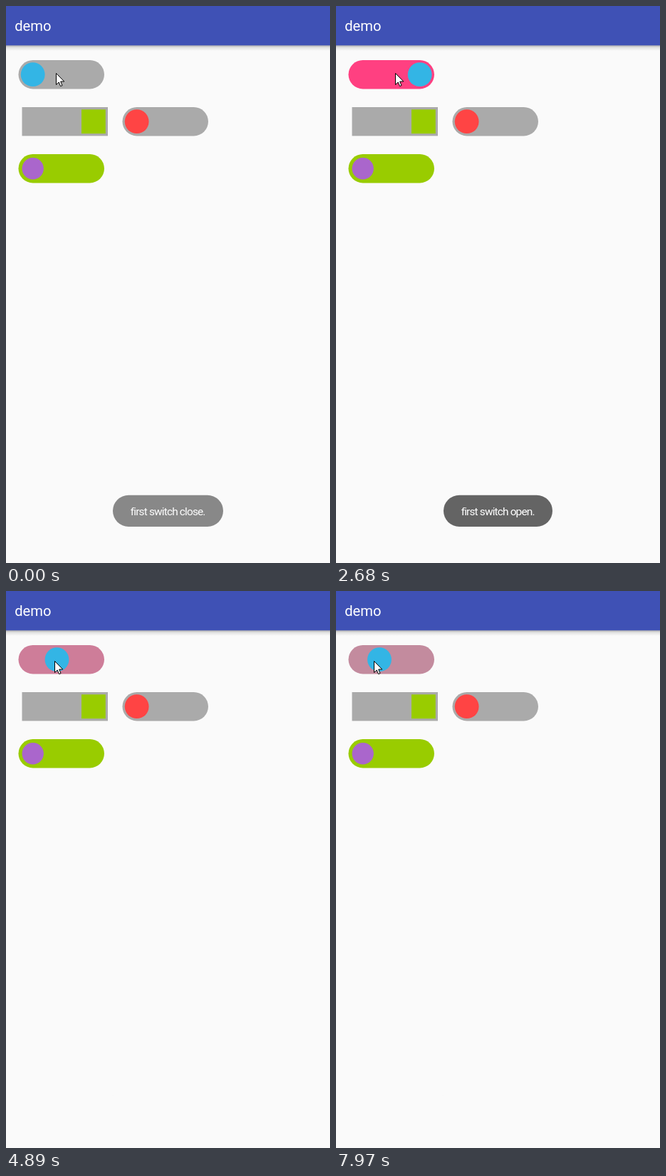
Recreate the animation shown at these times as an HTML page. Size 455 by 782 pixels, loop 8000 ms.

```html
<!DOCTYPE html>
<html lang="en">
<head>
<meta charset="utf-8">
<title>Switch demo</title>
<style>
html, body { margin: 0; width: 100%; height: 100%; overflow: hidden; background: #fafafa; }
svg { display: block; width: 100%; height: 100%; }
text { font-family: Roboto, sans-serif; fill: #fff; }
</style>
</head>
<body>
<svg viewBox="0 0 455 782">
  <defs>
    <linearGradient id="shade" x2="0" y2="1">
      <stop offset="0" stop-opacity=".32"/>
      <stop offset=".4" stop-opacity=".1"/>
      <stop offset="1" stop-opacity="0"/>
    </linearGradient>
    <rect id="bar" width="120.5" height="40.4"/>
    <rect id="slot" width="120.5" height="40.4" rx="20.2"/>
  </defs>
  <rect width="455" height="782" fill="#fafafa"/>
  <rect y="55" width="455" height="8" fill="url(#shade)"/>
  <rect width="455" height="55.3" fill="#3f51b5"/>
  <text x="12.2" y="35" font-size="20.2">demo</text>

  <use id="track" href="#slot" x="17.5" y="76"/>
  <circle id="knob" cy="96.2" r="16.9" fill="#33b5e5"/>

  <use href="#bar" x="22.5" y="142" fill="#aaa"/>
  <rect x="106" y="145.3" width="33.8" height="33.8" fill="#9c0"/>

  <use href="#slot" x="163.5" y="142" fill="#aaa"/>
  <circle cx="183.7" cy="162.2" r="16.9" fill="#f44"/>

  <use href="#slot" x="17.5" y="208" fill="#9c0"/>
  <circle cx="37.7" cy="228.2" r="15.2" fill="#a6c"/>

  <g id="toast">
    <rect id="pill" y="686.7" height="44.2" rx="22.1" fill="#646464"/>
    <text id="label" x="227.2" y="715.2" font-size="15.5" letter-spacing="-.87" text-anchor="middle"></text>
  </g>

  <path id="cursor" d="M.5 .5V16.5L4.2 13L6.6 18.6L9 17.6L6.7 12H11.8Z" fill="#fff" stroke="#000"/>
</svg>
<script>
const LOOP = 8000, REFRESH = 139, LEAD = 115;
const OFF = 37.7, ON = 117.7;
const FADE = 310, TOAST_LIFE = 2055;
const $ = id => document.getElementById(id);

const clamp = (v, lo, hi) => Math.min(hi, Math.max(lo, v));
const ramp = (t, from, to) => clamp((t - from) / (to - from), 0, 1);
const glide = (t, from, to) => (1 - Math.cos(Math.PI * ramp(t, from, to))) / 2;

function cursorAt(t) {
  const hover = 13 * glide(t, 600, 1050);
  const wander = 45 * glide(t, 3000, 3630) - 13 * glide(t, 2810, 3000);
  const firstDrag = 59 * glide(t, 4734, 5300) - 57 * glide(t, 3860, 4734);
  const secondDrag = 23 * glide(t, 7700, 7940) - 87 * glide(t, 6500, 7440);
  const arc = ramp(t, 2810, 3630);
  return {
    x: Math.round(70 + hover + wander + firstDrag + secondDrag),
    y: Math.round(94 + 4 * arc + 10 * Math.sin(Math.PI * arc))
  };
}

// A tap flips the switch; later the knob follows the cursor, which slips along it at each end.
function knobAt(t, cursorX) {
  if (t < 3800) return OFF + (ON - OFF) * glide(t, 1850, 2220);
  const grip = t < 6000 ? 3.5 : t < 7600 ? 1.4 : 8;
  return clamp(cursorX + grip, OFF, ON);
}

const toastAlpha = (t, start) =>
  ramp(t, start, start + FADE) - ramp(t, start + TOAST_LIFE, start + TOAST_LIFE + FADE);

function draw(time) {
  const t = Math.max(0, Math.floor((time + LEAD) / REFRESH) * REFRESH - LEAD);

  const cursor = cursorAt(t);
  $('cursor').setAttribute('transform', `translate(${cursor.x} ${cursor.y})`);

  const x = knobAt(t, cursor.x), on = (x - OFF) / (ON - OFF);
  $('knob').setAttribute('cx', x);
  $('track').setAttribute('fill',
    `rgb(${[255, 64, 129].map(c => Math.round(170 + (c - 170) * on))})`);

  const opened = t > 2200, width = opened ? 153 : 155;
  $('toast').setAttribute('opacity', toastAlpha(t, opened ? 2310 : -235));
  $('pill').setAttribute('x', 227.5 - width / 2);
  $('pill').setAttribute('width', width);
  $('label').textContent = `first switch ${opened ? 'open' : 'close'}.`;
}

const start = performance.now();
function frame() {
  draw((performance.now() - start) % LOOP);
  requestAnimationFrame(frame);
}
frame();
</script>
</body>
</html>
```
